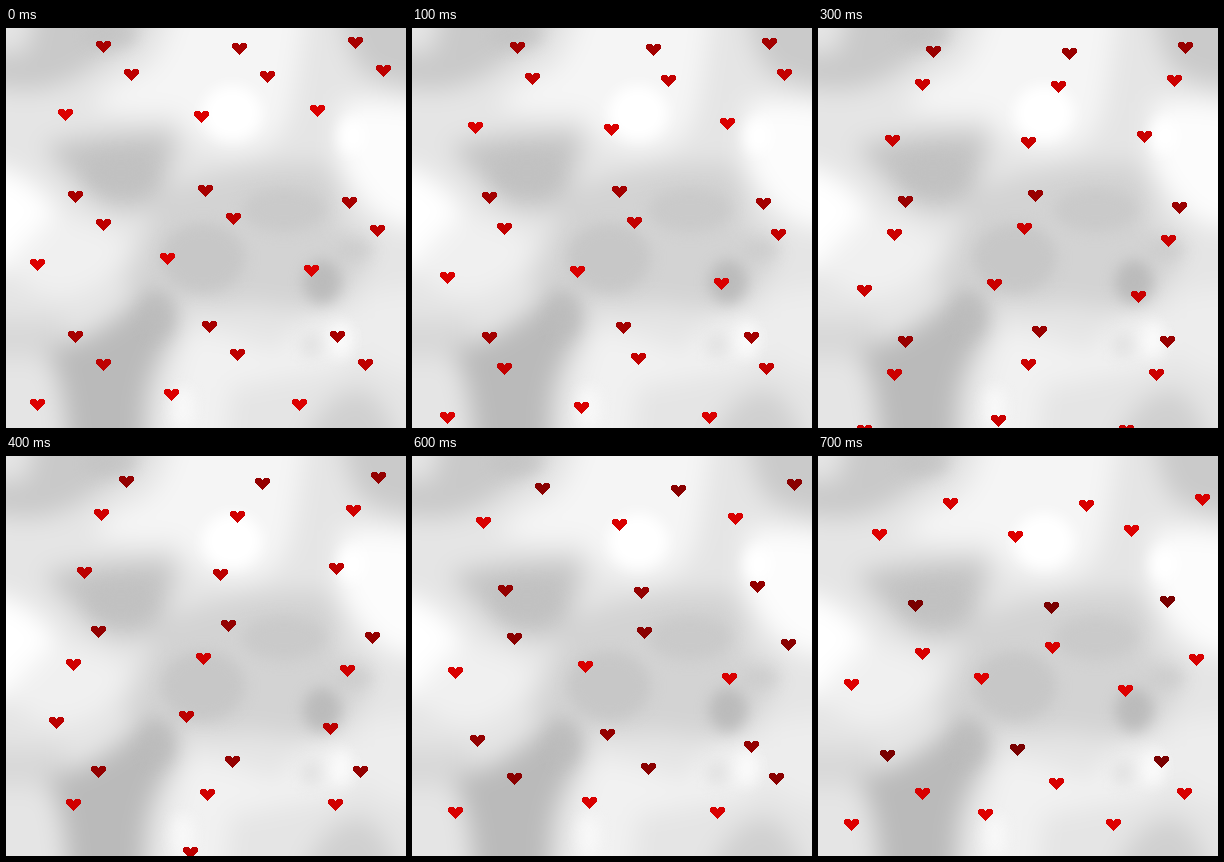
An HTML page that plays this animation: 400x400 px, repeating every 800 ms.

```html
<!DOCTYPE html>
<html lang="en">
<head>
<meta charset="utf-8">
<title>Falling hearts</title>
<style>
  html, body { margin: 0; width: 100%; height: 100%; overflow: hidden; background: #e4e4e4; }
  svg { display: block; width: 100vw; height: 100vh; }
</style>
</head>
<body>
<svg viewBox="0 0 400 400">
  <defs>
    <filter id="soft" filterUnits="userSpaceOnUse" x="-60" y="-60" width="520" height="520" color-interpolation-filters="sRGB">
      <feGaussianBlur stdDeviation="12"/>
    </filter>
    <filter id="fine" filterUnits="userSpaceOnUse" x="-60" y="-60" width="520" height="520" color-interpolation-filters="sRGB">
      <feGaussianBlur stdDeviation="7"/>
    </filter>
  </defs>

  <!-- broad cloud masses -->
  <g filter="url(#soft)">
    <rect x="-60" y="-60" width="520" height="520" fill="#e5e5e5"/>
    <path fill="#c9c9c9" d="M40-60H150Q140 15 100 28Q60 62 20 62L-60 55V25H20Z"/>
    <path fill="#f5f5f5" d="M175-60H305Q295 30 285 80Q275 125 225 126Q185 120 170 85Q130 90 85 80Q100 55 140 42Q165 20 175-60Z"/>
    <path fill="#cacaca" d="M335-60H390L460 62Q400 62 365 48Q335 35 335-60Z"/>
    <path fill="#fcfcfc" d="M335 75Q380 65 460 90V195Q400 208 375 190Q345 165 332 130Z"/>
    <path fill="#fff" d="M-60 135Q0 130 32 160Q65 190 65 220Q40 250-60 240Z"/>
    <path fill="#f0f0f0" d="M50 185Q100 195 125 215Q110 260 60 270Q20 270 0 235Z"/>
    <path fill="#d3d3d3" d="M150 165Q235 130 320 135Q345 175 330 200Q390 200 345 260Q315 292 250 275Q170 285 115 255Q140 225 150 165Z"/>
    <path fill="#c4c4c4" d="M38 118Q95 105 168 105Q168 150 142 178Q105 190 78 162Z"/>
    <path fill="#d8d8d8" d="M-60 285Q0 295 60 290V330H-60Z"/>
    <path fill="#bababa" d="M40 322Q100 310 140 262Q172 265 172 298Q145 335 140 370L135 460H62Q65 360 40 322Z"/>
    <path fill="#f1f1f1" d="M182 300Q230 305 270 325Q300 280 345 288Q365 315 335 340Q275 350 225 360L215 460H155Q155 370 182 300Z"/>
    <path fill="#ededed" d="M350 270Q400 255 460 260V350Q390 360 355 325Z"/>
    <path fill="#d0d0d0" d="M290 460Q300 372 350 362Q385 360 400 460Z"/>
  </g>

  <!-- smaller tones -->
  <g filter="url(#fine)">
    <ellipse cx="105" cy="8" rx="26" ry="12" fill="#c2c2c2" opacity=".6"/>
    <ellipse cx="226" cy="85" rx="30" ry="28" fill="#fff"/>
    <ellipse cx="346" cy="108" rx="14" ry="18" fill="#fff"/>
    <ellipse cx="115" cy="145" rx="32" ry="18" fill="#c0c0c0" opacity=".6"/>
    <ellipse cx="197" cy="230" rx="42" ry="35" fill="#c5c5c5" opacity=".8"/>
    <ellipse cx="278" cy="182" rx="42" ry="22" fill="#c6c6c6" opacity=".7"/>
    <ellipse cx="316" cy="254" rx="19" ry="22" fill="#b6b6b6" opacity=".8"/>
    <ellipse cx="348" cy="222" rx="18" ry="10" fill="#cacaca" opacity=".7"/>
    <ellipse cx="152" cy="288" rx="14" ry="20" fill="#bdbdbd" opacity=".6"/>
    <ellipse cx="305" cy="317" rx="11" ry="13" fill="#e2e2e2"/>
    <ellipse cx="335" cy="312" rx="11" ry="18" fill="#fafafa"/>
    <ellipse cx="177" cy="380" rx="11" ry="22" fill="#f8f8f8"/>
  </g>
  <g id="hearts" shape-rendering="crispEdges"></g>
</svg>
<script>
  const STEP = 100, STEPS = 8;

  const outline = 'M1 0h5v1h1v1h1v-1h1v-1h5v1h1v4' +
    'h-1v1'.repeat(7) + 'h-1' + 'v-1h-1'.repeat(7) + 'v-4h1z';

  // where each trio of hearts starts
  const trios = [
    [97, 18], [233, 20], [349, 14],
    [69, 168], [199, 162], [343, 174],
    [69, 308], [203, 298], [331, 308]
  ];

  // the three legs of a swaying fall, relative to the trio, with their shade of red
  const keySteps = [0, 1, 2, 4, 6, 7];
  const legs = [
    { keys: [[0, 0], [8, 1], [13, 3], [23, 7], [33, 14], [35, 29]], red: s => s < 7 ? 168 - 5 * s : 216 },
    { keys: [[28, 28], [23, 32], [16, 36], [-2, 40], [-26, 48], [-36, 60]], red: s => 190 + 4.5 * s },
    { keys: [[-38, 68], [-34, 81], [-28, 89], [-19, 98], [-4, 116], [0, 131]], red: s => 220 - 2 * s * s }
  ];

  function along(keys, step) {
    const i = Math.max(1, keySteps.findIndex(k => k >= step));
    const from = keySteps[i - 1];
    const part = (step - from) / (keySteps[i] - from);
    return keys[i].map((v, n) => Math.round(keys[i - 1][n] + (v - keys[i - 1][n]) * part));
  }

  const layer = document.getElementById('hearts');
  const hearts = trios.flatMap(([x, y]) => legs.map(leg => {
    const el = document.createElementNS('http://www.w3.org/2000/svg', 'path');
    el.setAttribute('d', outline);
    layer.append(el);
    return { el, leg, x, y };
  }));

  function draw(time) {
    const step = Math.floor(time / STEP) % STEPS;
    for (const { el, leg, x, y } of hearts) {
      const [dx, dy] = along(leg.keys, step);
      el.setAttribute('transform', `translate(${x + dx - 7} ${y + dy - 5})`);
      el.setAttribute('fill', `rgb(${Math.round(leg.red(step))},0,0)`);
    }
  }

  const start = performance.now();
  function tick() {
    draw(performance.now() - start);
    requestAnimationFrame(tick);
  }
  tick();
</script>
</body>
</html>
```
